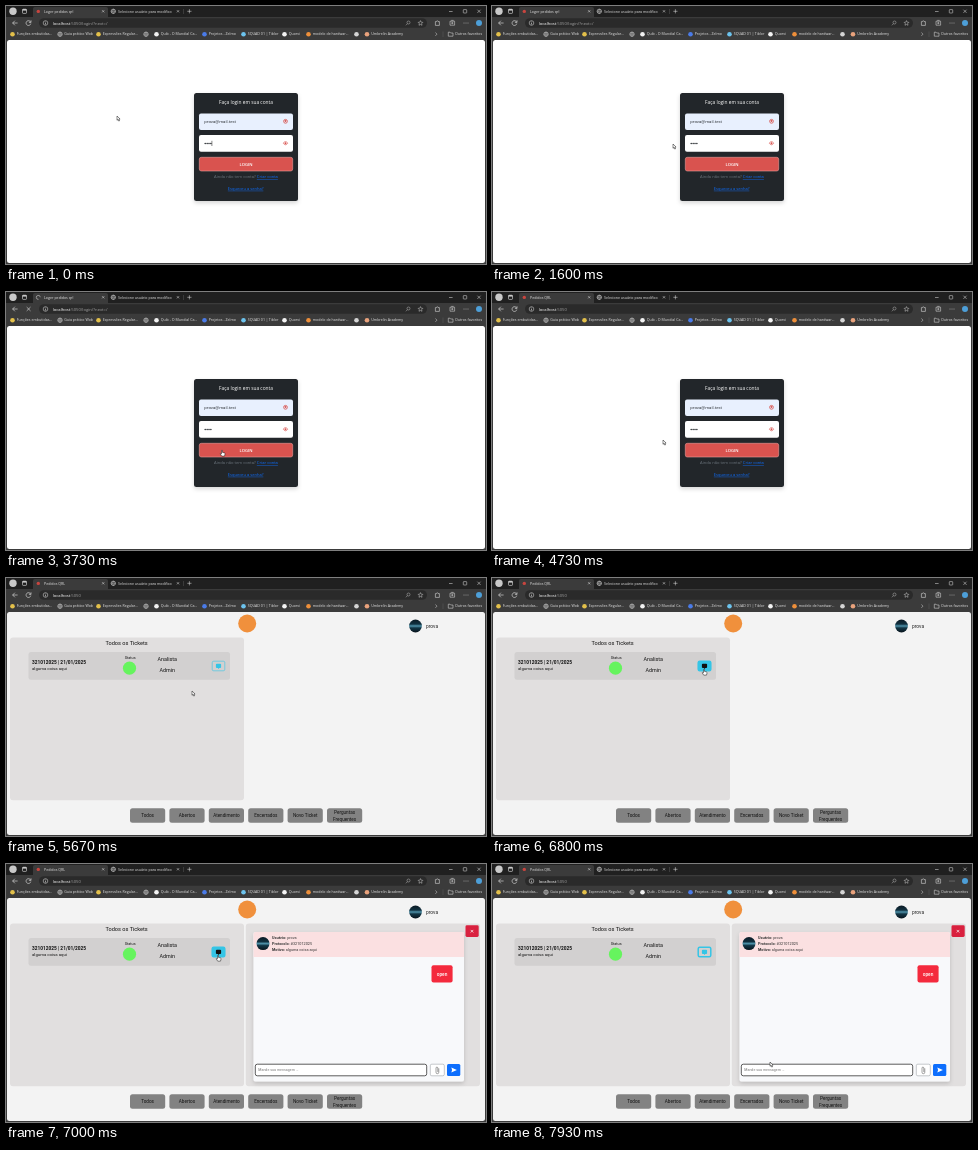
These frames come from a looping animation (480x258 px, 8000 ms). An HTML page:

```html
<!DOCTYPE html>
<html lang="pt-BR">
<head>
<meta charset="utf-8">
<title>Pedidos</title>
<style>
  html, body { margin: 0; width: 100%; height: 100%; overflow: hidden; background: #3b3b3b; }
  svg { display: block; width: 100vw; height: 100vh; }
  text { font-family: "Open Sans", "Noto Sans", sans-serif; white-space: pre; }
  .app text { font-family: Roboto, "Liberation Sans", sans-serif; }
</style>
</head>
<body>
<svg id="stage" viewBox="0 0 480 258" preserveAspectRatio="none"></svg>
<script>
const LOOP = 8000, STEP = 1000 / 15;
const RED = '#d9534f', CYAN = '#35c5e6', PANEL = '#e1dfdf';

// Markup helpers; text is placed by the middle of its capitals.
const rect = (x, y, x2, y2, r, fill, extra = '') =>
  `<rect x="${x}" y="${y}" width="${x2 - x}" height="${y2 - y}" rx="${r}" fill="${fill}" ${extra}/>`;
const dot = (x, y, r, fill, extra = '') => `<circle cx="${x}" cy="${y}" r="${r}" fill="${fill}" ${extra}/>`;
const line = (d, color, w = .6, extra = '') =>
  `<path d="${d}" fill="none" stroke="${color}" stroke-width="${w}" ${extra}/>`;
const text = (x, y, str, size, fill, extra = '') =>
  `<text x="${x}" y="${y + size * .36}" font-size="${size}" fill="${fill}" ${extra}>${str}</text>`;
const mid = (x, y, str, size, fill, extra = '') => text(x, y, str, size, fill, `text-anchor="middle" ${extra}`);
const group = (id, body, extra = '') => `<g id="${id}" ${extra}>${body}</g>`;
const cross = (x, y, r, color, w) => line(`M${x - r} ${y - r}l${2 * r} ${2 * r}m0 ${-2 * r}l${-2 * r} ${2 * r}`, color, w);
const globe = (x, y) => dot(x, y, 2.2, 'none', 'stroke="#d8d8d8" stroke-width=".6"') +
  line(`M${x - 2.2} ${y}h4.4M${x} ${y - 2.2}q-2 2.2 0 4.4q2-2.2 0-4.4`, '#d8d8d8', .4);

const bookmarks = [
  [6.5, '#e3c04a', 'Funções embutidas...'],
  [54, null, 'Guia prático Wob'],
  [92.5, '#e3c04a', 'Expressões Regular...'],
  [140, null, ''],
  [150.5, '#f2f2f2', 'Quib - O Mundial Ca...'],
  [198.5, '#4a7be8', 'Projetos - Zelmo'],
  [237.5, '#6cc3ee', 'SQUAD 01 | Tiblor'],
  [278.5, '#f4f4f4', 'Quorvi'],
  [302.5, '#ee8f3a', 'modelo de hardwar...'],
  [350.5, '#d5d5d5', ''],
  [361, '#e9a27c', 'Umbrelin Academy'],
];

function chrome() {
  const ink = '#e6e6e6';
  return rect(0, 0, 480, 12, 0, '#202020') + rect(0, 11, 480, 258, 0, '#3b3b3b') +
    rect(27, 1, 102, 14, 2, '#3b3b3b') +
    dot(7, 5.3, 3.7, '#c9c9c9') +
    rect(16.5, 3.2, 20.5, 7.4, .7, 'none', `stroke="${ink}" stroke-width=".6"`) + rect(16.5, 3.2, 20.5, 4.6, .4, ink) +
    group('favicon', dot(32.3, 5.4, 1.7, '#c8453f')) +
    group('spinner', line('M30.3 5.4a2 2 0 1 1 2 2', '#c4c4c4', .6)) +
    group('tabTitle', text(38, 5.3, '', 3.6, ink)) + cross(97.2, 5.3, 1.1, ink, .5) +
    globe(107.3, 5.3) + text(112, 5.3, 'Selecione usuário para modifico', 3.6, ink) + cross(172, 5.3, 1.1, ink, .5) +
    line('M177.5 3v5', '#666', .4) + line('M181.3 5.3h4.2M183.4 3.2v4.2', ink, .5) +
    line('M443 5.5h3.6', ink, .5) + rect(457.3, 3.6, 460.7, 7, .5, 'none', `stroke="${ink}" stroke-width=".5"`) +
    cross(473, 5.3, 1.6, ink, .5) +
    line('M11.6 17H6.6m2.3-2.3L6.6 17l2.3 2.3', ink) +
    group('reload', line('M24.7 16.2a2.4 2.4 0 1 0 .1 1.4M25 14.3v2.1h-2.1', ink)) +
    group('stop', cross(22.6, 17, 1.9, ink, .6)) +
    rect(33, 12.2, 421, 21.8, 4.8, '#2a2a2a') +
    dot(39.5, 17, 2.3, 'none', `stroke="${ink}" stroke-width=".5"`) + line('M39.5 15.7v.6m0 .5v1.7', ink, .6) +
    text(46.8, 17, 'localhost<tspan fill="#a0a0a0">:5050<tspan id="urlPath">/login/?next=/</tspan></tspan>', 4.17, '#fff') +
    dot(402.5, 16.5, 1.5, 'none', 'stroke="#bbb" stroke-width=".5"') + line('M401.4 17.7l-1.5 1.6', '#bbb', .5) +
    line('M414.5 14.6l.7 1.6 1.7.2-1.2 1.2.3 1.7-1.5-.9-1.5.9.3-1.7-1.2-1.2 1.7-.2z', '#ddd', .45) +
    line('M429.4 15.6h1.2q.7-2 1.4 0h1.4v3.8h-4z', ink, .55) +
    line('M444 15.2h4.6v4h-4.6zM445.2 14.4h2.4M446.3 16v2.2m-1.1-1.1h2.2', ink, .5) +
    [458, 460, 462].map(x => dot(x, 17, .45, ink)).join('') +
    dot(473, 17, 3, '#4d9fd8') +
    bookmarks.map(([x, color, name]) =>
      (color ? dot(x, 28.2, 2.3, color) : globe(x, 28.2)) + text(x + 4.2, 28.2, name, 3.6, ink)).join('') +
    line('M429.4 26.6l1.6 1.6-1.6 1.6', ink, .5) + line('M437 25.5v5.5', '#666', .4) +
    line('M442.3 26.2h1.7l.7.8h2.3v3.2h-4.7z', ink, .5) + text(449, 28.2, 'Outros favoritos', 3.6, ink) +
    rect(1, 34, 479, 257, 2.5, '#fff', 'id="page"');
}

function login() {
  const link = 'fill="#0d6efd" text-decoration="underline"';
  const dots = [0, 1, 2, 3].map(i => dot(199.2 + i * 1.9, 137.5, .75, '#212529')).join('');
  return rect(188, 87, 292, 195, 2.5, '#212529', 'filter="url(#shadow)"') +
    mid(240, 96.3, 'Faça login em sua conta', 4.84, '#fff') +
    rect(193, 107.5, 287, 124, 2, '#e8f0fe') + text(198.2, 115.8, 'prova@mail.test', 4.24, '#212529') +
    dot(279.5, 115.3, 1.9, 'none', `stroke="${RED}" stroke-width=".8"`) + dot(279.5, 115, .9, RED) +
    rect(193, 129, 287, 145.7, 2, '#fff') + dots +
    group('caret', line('M205.9 134.8v5.2', '#111', .5)) +
    line('M277.1 137.2q2.4-3.2 4.8 0q-2.4 3.2-4.8 0z', RED, .6) + dot(279.5, 137.2, 1, RED) +
    rect(193.3, 151.3, 286.7, 165, 2, RED, 'stroke="#e79a97" stroke-width=".6"') +
    mid(240, 158.2, 'LOGIN', 4.2, '#fff', 'font-weight="600"') +
    mid(240, 170.8, `Ainda não tem conta? <tspan ${link}>Criar conta</tspan>`, 4.13, '#6c757d') +
    mid(239.6, 182.3, `<tspan ${link}>Esqueceu a senha?</tspan>`, 4.05, '#0d6efd');
}

const avatar = (x, y, r) => dot(x, y, r, 'url(#night)');

function tickets() {
  const buttons = ['Todos', 'Abertos', 'Atendimento', 'Encerrados', 'Novo Ticket', 'Perguntas|Frequentes'];
  return group('images', dot(241.2, 45.5, 9, '#f0903c') + avatar(409.5, 48, 6.4)) +
    text(420, 48, 'prova', 4.9, '#222') +
    rect(4, 59.5, 238, 222.3, 3, PANEL) + mid(120.6, 65.3, 'Todos os Tickets', 5.6, '#111') +
    rect(22.5, 74, 224, 101.7, 2.5, '#d2d0d0') +
    text(26, 84.2, '321012025 | 21/01/2025', 4.8, '#111', 'font-weight="700"') +
    text(26, 90.4, 'alguma coisa aqui', 4.3, '#111') +
    mid(124.2, 79.3, 'Status', 3.8, '#111') + dot(123.5, 90.2, 6.6, '#66f45e') +
    mid(161.2, 81, 'Analista', 5.4, '#111') + mid(161.2, 92, 'Admin', 5.4, '#111') +
    rect(206.2, 83.2, 218.8, 92.8, 1.5, 'none', `id="openBtn" stroke="${CYAN}" stroke-width=".6"`) +
    group('openIcon', rect(209.9, 85.7, 215.1, 90, 1, 'currentColor') +
      '<path d="M211.5 89.5h2.2l-1.1 1.6z" fill="currentColor"/>') +
    buttons.map((label, i) => {
      const x = 124 + i * 39.4, rows = label.split('|');
      return rect(x, 230.3, x + 35.2, 244.8, 2.5, '#828282') +
        rows.map((row, k) => mid(x + 17.6, 237.6 + (k - (rows.length - 1) / 2) * 6.6, row, 4.65, '#111')).join('');
    }).join('') +
    group('side', rect(239.8, 59.5, 474, 222.3, 3, PANEL)) + group('chat', chat());
}

function chat() {
  const bold = s => `<tspan font-weight="700">${s}</tspan>`;
  return rect(459.5, 61.3, 472.7, 73, 1.4, '#d9213f') + cross(466, 67.2, 1.3, '#fff', .7) +
    rect(247.5, 68, 458, 217.5, 2, '#f8f9fb', 'filter="url(#shadow)"') +
    '<path d="M247.5 93V70q0-2 2-2H456q2 0 2 2v23z" fill="#fbe0e1"/>' + avatar(257, 79.6, 6.5) +
    text(266, 73.6, bold('Usuário:') + ' prova', 3.8, '#333') +
    text(266, 79.8, bold('Protocolo:') + ' #321012025', 3.8, '#333') +
    text(266, 86.1, bold('Motivo:') + ' alguma coisa aqui', 3.8, '#333') +
    rect(425.5, 101.2, 446.6, 118.4, 2, '#f42a3d') + mid(436, 110, 'open', 4.8, '#fff', 'font-weight="500"') +
    rect(249.3, 200.2, 420.7, 211.8, 2, '#fff', 'stroke="#333" stroke-width=".8"') +
    text(252.3, 206, 'Mande sua mensagem ...', 3.6, '#777') +
    rect(424.3, 200.2, 438.3, 211.8, 1.5, '#fff', 'stroke="#8a9097" stroke-width=".5"') +
    line('M432.8 204.3v4a1.4 1.4 0 0 1-2.8 0v-4.3a.9.9 0 0 1 1.8 0v4', '#444', .5) +
    rect(441, 200, 454.3, 212, 1.5, '#0d6efd') + '<path d="M445.3 203.6l5.6 2.4-5.6 2.4.8-2.4z" fill="#fff"/>';
}

function pointers() {
  const pen = 'fill="#fff" stroke="#111" stroke-width=".5" stroke-linejoin="round"';
  return group('cursor',
    `<path id="arrow" d="M0 0v4.3l1-.9.8 1.7.8-.4-.8-1.6 1.3-.1z" ${pen}/>` +
    `<path id="hand" d="M-.5 .4q.5-.8 1 0v2l2 .5q.7.3.5 1.2l-.5 2H-.3l-1.6-2.3q.4-.7 1.4 0z" ${pen}/>` +
    `<path id="beam" d="M-1-2.5h2M0-2.5v5M-1 2.5h2" fill="none" stroke="#333" stroke-width=".5"/>`);
}

const stage = document.getElementById('stage');
stage.innerHTML = `<defs>
  <filter id="shadow" x="-10%" y="-10%" width="120%" height="125%">
    <feDropShadow dx="0" dy="2" stdDeviation="2" flood-color="#000" flood-opacity=".16"/></filter>
  <linearGradient id="night" x2="0" y2="1"><stop offset="0" stop-color="#0b1a24"/><stop offset=".35" stop-color="#10303f"/>
    <stop offset=".5" stop-color="#4f93ab"/><stop offset=".65" stop-color="#123646"/><stop offset="1" stop-color="#08131b"/></linearGradient>
  </defs>` + chrome() + group('login', login()) + group('tickets', tickets(), 'class="app"') + pointers();

const el = id => document.getElementById(id);
const show = (id, on) => el(id).setAttribute('display', on ? 'inline' : 'none');
const within = (t, a, b) => t >= a && t < b;
const over = ([x, y], x1, y1, x2, y2) => x >= x1 && x <= x2 && y >= y1 && y <= y2;

// Pointer stops: time, x, y.
const path = [
  [0, 111, 110], [1467, 111, 110], [1533, 150, 128], [1600, 181, 138], [2067, 181, 138], [2267, 197, 112],
  [2400, 214, 98], [2600, 232, 138], [2733, 230, 164], [2933, 216, 158], [3800, 216, 158],
  [4133, 205, 168], [4400, 184, 158], [4667, 171, 148], [5600, 171, 148], [5667, 186, 113],
  [5933, 199, 100], [6200, 208, 93], [6467, 212, 91], [7267, 212, 91], [7467, 228, 118],
  [7733, 262, 176], [7933, 278, 198], [LOOP, 278, 198],
];

function pointerAt(t) {
  const i = Math.max(1, path.findIndex(p => p[0] >= t));
  const [t0, x0, y0] = path[i - 1], [t1, x1, y1] = path[i];
  const k = (t - t0) / (t1 - t0);
  return [x0 + (x1 - x0) * k, y0 + (y1 - y0) * k];
}

function render(now) {
  const t = Math.floor((now % LOOP + 4) / STEP) * STEP % LOOP + .5;
  const onLogin = t < 4800, redirected = t >= 3866, loading = within(t, 3066, 4733);

  show('login', onLogin);
  show('tickets', !onLogin);
  show('images', t >= 4866);
  show('side', t >= 6866);
  show('chat', t >= 7000);
  el('page').setAttribute('fill', onLogin ? '#fff' : '#f3f3f3');
  show('caret', t < 533 || within(t, 1000, 1533) || within(t, 2133, 2600));

  el('tabTitle').firstChild.textContent = redirected ? 'Pedidos QRL' : 'Loger pedidos qrl';
  show('urlPath', !redirected);
  show('favicon', !loading);
  show('spinner', loading);
  el('spinner').setAttribute('transform', `rotate(${t * .36} 32.3 5.4)`);
  show('stop', within(t, 3066, 3800));
  show('reload', !within(t, 3066, 3800));

  const p = pointerAt(t);
  const overOpen = !onLogin && over(p, 205, 82, 220, 95);
  const opened = t >= 6800;
  const hand = overOpen || onLogin && over(p, 193, 151, 287, 165);
  const beam = onLogin && (over(p, 193, 107, 287, 124) || over(p, 193, 129, 287, 146));
  show('hand', hand);
  show('beam', beam);
  show('arrow', !hand && !beam);
  el('cursor').setAttribute('transform', `translate(${p})`);
  el('openBtn').setAttribute('fill', overOpen ? CYAN : 'none');
  el('openBtn').setAttribute('stroke-width', opened ? 1.5 : .6);
  el('openIcon').setAttribute('color', overOpen ? '#111' : CYAN);
}

const start = performance.now();
function tick() {
  render(performance.now() - start);
  requestAnimationFrame(tick);
}
tick();
</script>
</body>
</html>
```
